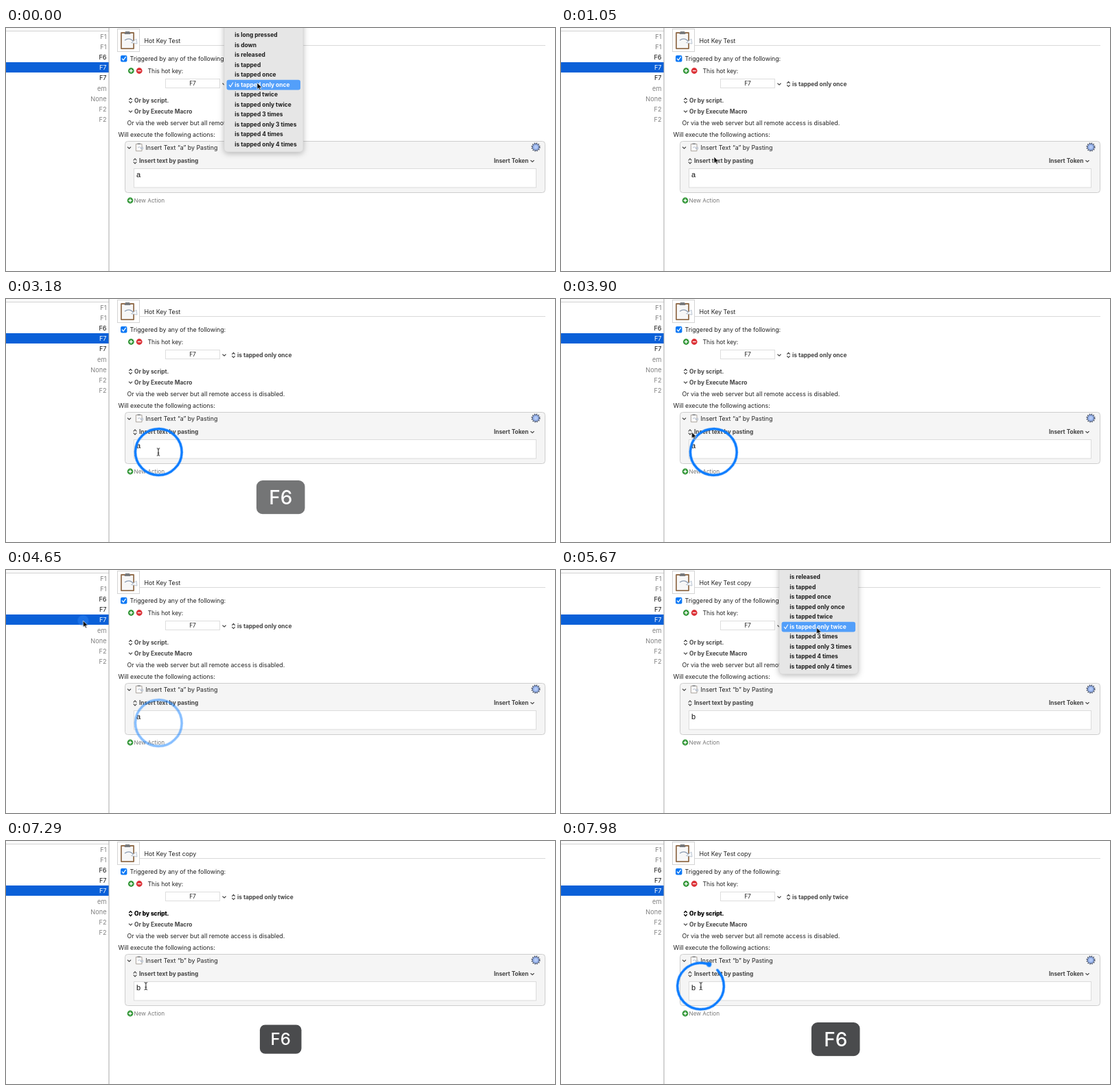
Write an HTML page that moves like this. It is 800 by 355 pixels and loops after 8000 ms.

```html
<!DOCTYPE html>
<html lang="en">
<head>
<meta charset="utf-8">
<title>Hot key macro editor</title>
<style>
  html, body { margin: 0; width: 100%; height: 100%; overflow: hidden; background: #fff; }
  svg { display: block; width: 100%; height: 100%; }
  text { font: 400 8.8px Inter, "Open Sans", sans-serif; fill: #222; white-space: pre; }
  .bold { font-size: 8.35px; font-weight: 700; fill: #444; }
  .items text, .picked text { font-size: 8.45px; font-weight: 700; fill: #1c1c1c; }
  .list text { font-size: 9.2px; text-anchor: end; fill: #808080; }
  .list .on { fill: #111; }
  .list .sel, .picked text { fill: #fff; }
  .field { font: 11px "Liberation Sans", Arial, sans-serif; fill: #111; }
  .soft { font-size: 8.2px; fill: #777; }
  .key text { font-size: 28px; font-weight: 500; fill: #fff; text-anchor: middle; }
  .line { fill: none; stroke: #444; stroke-width: 1.1; stroke-linecap: round; stroke-linejoin: round; }

  /* One shared 8 s clock: 1% = 80 ms */
  .loop { animation: 8s linear infinite; }
  .hard { animation-timing-function: step-end; }

  .before-pick { animation-name: before-pick; }
  .after-pick { animation-name: after-pick; }
  @keyframes before-pick { 0% { opacity: 1 } 56.625%, 100% { opacity: 0 } }
  @keyframes after-pick { 0% { opacity: 0 } 56.625%, 100% { opacity: 1 } }

  .macro-a { animation-name: macro-a; }
  .macro-b { animation-name: macro-b; }
  @keyframes macro-a { 0% { opacity: 1 } 59.25%, 100% { opacity: 0 } }
  @keyframes macro-b { 0% { opacity: 0 } 59.25%, 100% { opacity: 1 } }

  .hovered { animation-name: hovered; }
  @keyframes hovered { 0% { opacity: 0 } 77%, 100% { opacity: 1 } }

  .menu { filter: drop-shadow(0 2px 4px #0004); }
  .menu-a { animation-name: menu-a; }
  .menu-b { animation-name: menu-b; }
  @keyframes menu-a { 0%, 4.125% { opacity: 1 } 6.25%, 100% { opacity: 0 } }
  @keyframes menu-b { 0%, 66.37% { opacity: 0 } 66.375%, 72.5% { opacity: 1 } 74.5%, 100% { opacity: 0 } }

  .pointer { animation-name: pointer; animation-timing-function: ease-in-out; }
  @keyframes pointer {
    0%, 6% { transform: translate(366px, 80px) }
    13.1% { transform: translate(223px, 188px) }
    13.9% { transform: translate(222.5px, 191px) }
    16.125%, 46.125% { transform: translate(222px, 223.5px) }
    54.75% { transform: translate(60px, 73px) }
    56.75% { transform: translate(60px, 73px); animation-timing-function: ease-in }
    58.125% { transform: translate(111.5px, 74px); animation-timing-function: ease-out }
    64.5%, 73% { transform: translate(372.5px, 84px) }
    77% { transform: translate(215px, 106px) }
    82.5%, 100% { transform: translate(203.7px, 212px) }
  }
  .arrow { animation-name: arrow; }
  .beam { animation-name: beam; }
  @keyframes arrow { 0% { opacity: 1 } 15% { opacity: 0 } 47.25% { opacity: 1 } 81.25%, 100% { opacity: 0 } }
  @keyframes beam { 0% { opacity: 0 } 15% { opacity: 1 } 47.25% { opacity: 0 } 81.25%, 100% { opacity: 1 } }
  .press { animation-name: press; }
  @keyframes press { 0%, 56.24% { opacity: 0 } 56.25% { opacity: .7 } 60%, 100% { opacity: 0 } }

  .ring { fill: none; stroke: #0a7bff; stroke-width: 3.6; stroke-linecap: round; stroke-dasharray: 360 400; }
  .head { fill: #0a7bff; }
  .show-a { animation-name: show-a; }
  .draw-a { animation-name: draw-a; }
  .turn-a { animation-name: turn-a; }
  .head-a { animation-name: head-a; }
  @keyframes show-a { 0%, 27.5% { opacity: 0 } 27.51%, 56.25% { opacity: 1 } 60%, 100% { opacity: 0 } }
  @keyframes draw-a { 0%, 27.375% { stroke-dashoffset: 360 } 36.65%, 100% { stroke-dashoffset: 0 } }
  @keyframes turn-a { 0%, 27.375% { transform: rotate(0deg) } 36.65%, 100% { transform: rotate(360deg) } }
  @keyframes head-a { 0% { opacity: 1 } 36.65%, 100% { opacity: 0 } }
  .show-b { animation-name: show-b; }
  .draw-b { animation-name: draw-b; }
  .turn-b { animation-name: turn-b; }
  @keyframes show-b { 0% { opacity: 0 } 91.25%, 100% { opacity: 1 } }
  @keyframes draw-b { 0%, 91.125% { stroke-dashoffset: 360 } 100% { stroke-dashoffset: 15.5 } }
  @keyframes turn-b { 0%, 91.125% { transform: rotate(0deg) } 100% { transform: rotate(344.5deg) } }

  .key { animation-name: key-fade; }
  .pop { animation-name: key-pop; animation-timing-function: ease-out; }
  @keyframes key-fade {
    0%, 27.37% { opacity: 0 }
    27.375%, 39.74% { opacity: 1 }
    39.75% { opacity: .77 }
    42.75%, 91.12% { opacity: 0 }
    91.125%, 100% { opacity: 1 }
  }
  @keyframes key-pop {
    0%, 27.375% { transform: scale(.857) }
    29%, 60% { transform: scale(1) }
    60.01%, 91.125% { transform: scale(.857) }
    92.75%, 100% { transform: scale(1) }
  }
</style>
</head>
<body>
<svg viewBox="0 0 800 355" preserveAspectRatio="none">
  <defs>
    <path id="down" class="line" d="M-2.2-1L0 1.2L2.2-1"/>
    <path id="updown" class="line" d="M-2-1.4L0-3.6L2-1.4M-2 1.4L0 3.6L2 1.4"/>
    <g id="plus"><circle r="4.4" fill="#35983a"/><path d="M-2.4 0H2.4M0-2.4V2.4" stroke="#fff" stroke-width="1.3"/></g>
    <g id="clipboard">
      <rect x="-11" y="-12" width="20" height="25" rx="1.2" fill="#94704f"/>
      <path d="M-9.2-10H7.2V11.2H-9.2Z" fill="#f7f7f7"/>
      <path d="M-5.5-9H3.5L2-13H-4Z" fill="#77797c"/>
      <path d="M-5 0Q2-5 8 2" fill="none" stroke="#8b9ab0" stroke-width="1.3"/>
      <path d="M4.5 3.5L13 5L12-2Z" fill="#f6f8fb" stroke="#a3afc0" stroke-width=".7"/>
    </g>
    <g id="items" class="items"></g>
  </defs>

  <rect width="800" height="355" fill="#fff"/>

  <!-- Macro list -->
  <rect width="150" height="4" fill="#fafafa"/>
  <path d="M0 4.5H150" stroke="#d4d4d4"/>
  <rect class="loop hard before-pick" y="50" width="150" height="15" fill="#0a60d8"/>
  <rect class="loop hard after-pick" y="65" width="150" height="15" fill="#0a60d8"/>
  <g class="list" id="list"></g>
  <g class="list loop hard before-pick"><text class="sel" x="146.5" y="61.2">F7</text><text class="on" x="146.5" y="76.4">F7</text></g>
  <g class="list loop hard after-pick"><text class="on" x="146.5" y="61.2">F7</text><text class="sel" x="146.5" y="76.4">F7</text></g>
  <path d="M150 0V355" stroke="#a8a8a8"/>

  <!-- Header and triggers -->
  <path d="M195 25.5H786" stroke="#d9d9d9"/>
  <rect x="162.5" y="1.5" width="32" height="33" fill="#fff" stroke="#d4d4d4"/>
  <use href="#clipboard" x="178" y="18"/>
  <rect x="167" y="40" width="9.4" height="9.4" rx="2" fill="#0a78f5"/>
  <path d="M169.2 44.9L171.1 47L174.3 42.3" class="line" style="stroke:#fff;stroke-width:1.3"/>
  <text x="180.5" y="48">Triggered by any of the following:</text>
  <use href="#plus" x="182.3" y="62.5"/>
  <circle cx="194.2" cy="62.5" r="4.4" fill="#dc3238"/>
  <path d="M191.8 62.5H196.6" stroke="#fff" stroke-width="1.3"/>
  <text x="206.5" y="65.8" style="font-size:8.6px">This hot key:</text>
  <rect x="232.5" y="74.5" width="79" height="13" fill="#fff" stroke="#dedede"/>
  <text x="272" y="84.4" text-anchor="middle" style="font-size:8.4px">F7</text>
  <use href="#down" x="318" y="82"/>
  <use href="#updown" x="331.5" y="82"/>
  <use href="#updown" x="181.5" y="106"/>
  <text class="bold" x="187" y="109">Or by script.</text>
  <g class="loop hard hovered">
    <use href="#updown" x="181.5" y="106" style="filter:brightness(0)"/>
    <text class="bold" x="187" y="109" style="fill:#000">Or by script.</text>
  </g>
  <use href="#down" x="181.5" y="122"/>
  <text class="bold" x="187" y="124.8">Or by Execute Macro</text>
  <text x="176.5" y="142.1">Or via the web server but all remote access is disabled.</text>
  <text x="163.5" y="159.2">Will execute the following actions:</text>

  <!-- Action -->
  <rect x="173.5" y="165.5" width="612" height="75" rx="4" fill="#f5f5f5" stroke="#cdcdcd"/>
  <use href="#down" x="179.5" y="175"/>
  <g transform="translate(194 174.5)">
    <path d="M-4.6-5H4V5.2H-4.6Z" fill="#fbfbfb" stroke="#a39a92" stroke-width=".9"/>
    <path d="M-2.4-5.2H1.8" stroke="#77797c" stroke-width="1.5"/>
    <path d="M-2 0Q1-2 3.5 1M2 1.6L5.6 2.3L5.2-.6Z" fill="#f6f8fb" stroke="#9ba8bb" stroke-width=".7"/>
  </g>
  <g transform="translate(772 174)">
    <circle r="5.7" fill="none" stroke="#4a5466" stroke-width="1.8" stroke-dasharray="1.49 1.49"/>
    <circle r="4.7" fill="#9db8ee" stroke="#4c5f8c" stroke-width="1"/>
    <circle r="2" fill="#b9cdf5"/>
  </g>
  <use href="#updown" x="188" y="194.5"/>
  <text class="bold" x="194" y="197.4">Insert text by pasting</text>
  <text class="bold" x="761.5" y="197.4" text-anchor="end">Insert Token</text>
  <use href="#down" x="767" y="194.5"/>
  <rect x="186.5" y="205.5" width="586" height="27.5" fill="#fff" stroke="#dcdcdc"/>
  <use href="#plus" x="181" y="252"/>
  <text class="soft" x="186.5" y="255">New Action</text>

  <g class="loop hard macro-a">
    <text x="201.5" y="22.4">Hot Key Test</text>
    <text class="bold" x="337" y="84.8">is tapped only once</text>
    <text x="203.5" y="178">Insert Text “a” by Pasting</text>
    <text class="field" x="190" y="218">a</text>
  </g>
  <g class="loop hard macro-b">
    <text x="201.5" y="22.4">Hot Key Test copy</text>
    <text class="bold" x="337" y="84.8">is tapped only twice</text>
    <text x="203.5" y="178">Insert Text “b” by Pasting</text>
    <text class="field" x="190" y="218">b</text>
  </g>

  <!-- Pop-up menus -->
  <g class="loop menu-a"><g class="menu">
    <rect x="318" y="-20" width="115" height="201" rx="5" fill="#e6e6e6" stroke="#d6d6d6" stroke-width=".6"/>
    <use href="#items"/>
    <g class="picked" id="pickA"></g>
  </g></g>
  <g class="loop menu-b"><g class="menu">
    <rect x="318" y="-20" width="115" height="172" rx="5" fill="#e6e6e6" stroke="#d6d6d6" stroke-width=".6"/>
    <use href="#items" y="-29"/>
    <g class="picked" id="pickB"></g>
  </g></g>

  <!-- Key press and ring -->
  <g transform="translate(400.2 289.6)"><g class="loop key"><g class="loop pop">
    <rect x="-35.3" y="-24.6" width="70.6" height="49.2" rx="9" fill="#4a4b4d"/>
    <text y="10.2">F6</text>
  </g></g></g>
  <g transform="translate(222.3 223.5) rotate(-44)"><g class="loop show-a">
    <circle class="ring loop draw-a" r="33.8" pathLength="360"/>
    <g class="loop turn-a"><circle class="head loop hard head-a" cx="33.8" r="3.6"/></g>
  </g></g>
  <g transform="translate(203.5 212) rotate(-44)"><g class="loop hard show-b">
    <circle class="ring loop draw-b" r="33.8" pathLength="360"/>
    <g class="loop turn-b"><circle class="head" cx="33.8" r="3.6"/></g>
  </g></g>

  <g class="loop pointer">
    <circle class="loop press" r="8" fill="#3f92ff"/>
    <path class="loop hard arrow" d="M0 0V9.6L2.2 7.6L3.7 11L5.3 10.3L3.8 7.1H6.8Z" fill="#000" stroke="#fff" stroke-width=".7"/>
    <path class="loop hard beam" d="M-2.2-5.3Q0-5.3 0-4Q0-5.3 2.2-5.3M0-4V4M-2.2 5.3Q0 5.3 0 4Q0 5.3 2.2 5.3M-1.2 1.6H1.2" fill="none" stroke="#111"/>
  </g>
</svg>
<script>
  const addText = (parent, x, y, label, cls = "") => {
    const node = document.createElementNS("http://www.w3.org/2000/svg", "text");
    node.setAttribute("x", x);
    node.setAttribute("y", y);
    node.setAttribute("class", cls);
    node.textContent = label;
    parent.append(node);
  };
  const byId = id => document.getElementById(id);

  ["F1", "F1", "F6", "", "", "em", "None", "F2", "F2"].forEach((label, i) =>
    addText(byId("list"), 146.5, 15.6 + i * 15.2, label, label === "F6" ? "on" : ""));

  ["long pressed", "down", "released", "tapped", "tapped once", "tapped only once",
    "tapped twice", "tapped only twice", "tapped 3 times", "tapped only 3 times",
    "tapped 4 times", "tapped only 4 times"].forEach((state, i) =>
    addText(byId("items"), 333.2, 13.3 + i * 14.5, "is " + state));

  const pick = (id, label) => {
    const group = byId(id);
    group.innerHTML = `<rect x="321.5" y="75.7" width="107.5" height="14.7" rx="3" fill="#539ffa"/>
      <path d="M325.3 83.4L327.2 85.8L330.6 80" class="line" style="stroke:#fff"/>`;
    addText(group, 333.2, 85.8, label);
  };
  pick("pickA", "is tapped only once");
  pick("pickB", "is tapped only twice");
</script>
</body>
</html>
```
